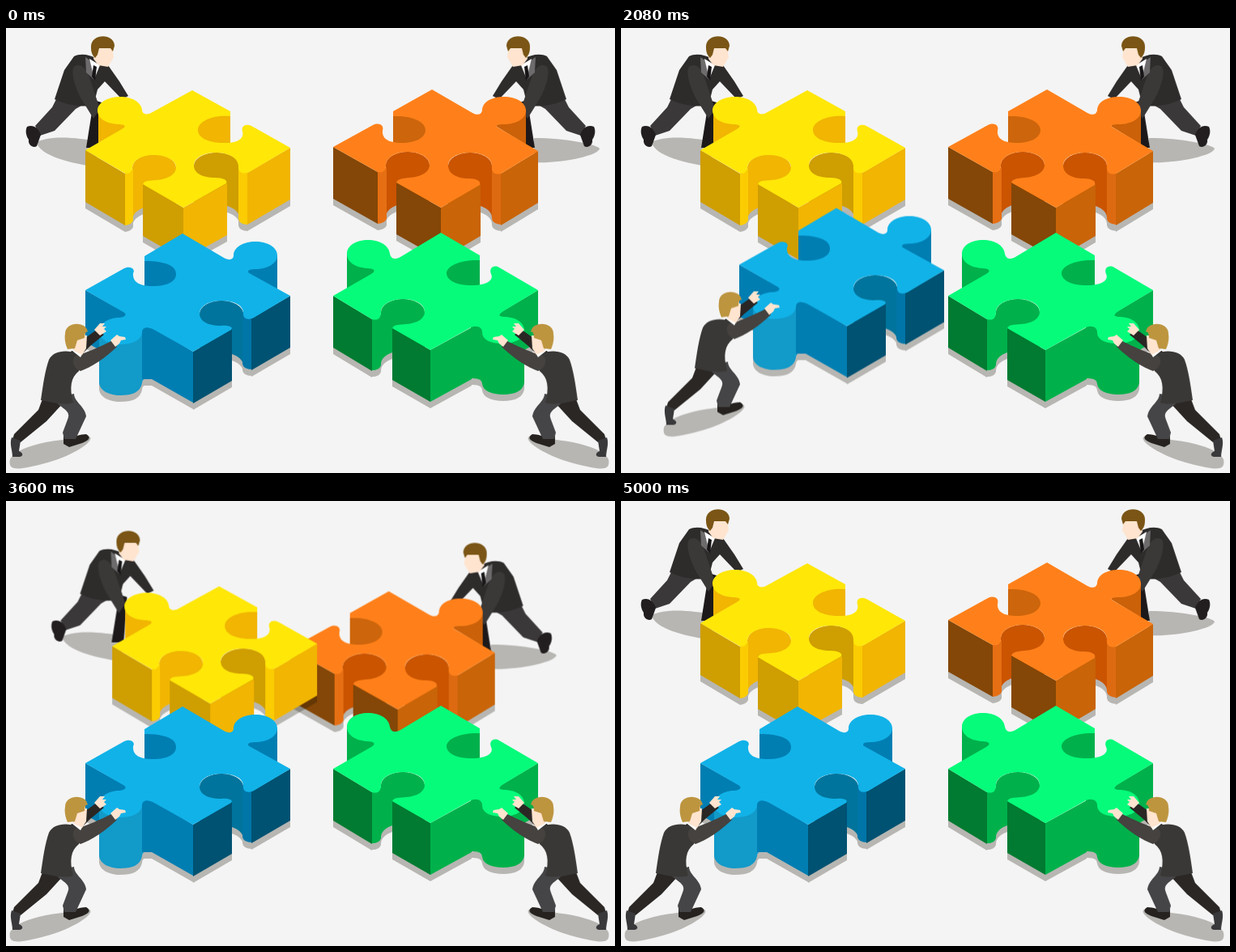
An HTML page that plays this animation: 752x550 px, repeating every 5040 ms.

```html
<!DOCTYPE html>
<html lang="en">
<head>
<meta charset="utf-8">
<title>Puzzle team</title>
<style>
html, body { margin: 0; width: 100%; height: 100%; overflow: hidden; background: #f4f4f4; }
svg { display: block; width: 752px; height: 550px; }
.move { animation: 5040ms linear infinite; }
.green { animation-name: green; }
.blue { animation-name: blue; }
.yellow { animation-name: yellow; }
.orange { animation-name: orange; }
@keyframes green {
  0%, .99%, 36.51%, 100% { transform: translate(0, 0); }
  18.06%, 23.31% { transform: translate(var(--x), var(--y)); }
}
@keyframes blue {
  0%, 21.43%, 57.54%, 100% { transform: translate(0, 0); }
  34.52%, 44.44% { transform: translate(var(--x), var(--y)); }
}
@keyframes yellow {
  0%, 42.26%, 78.08%, 100% { transform: translate(0, 0); }
  55.36%, 64.88% { transform: translate(var(--x), var(--y)); }
}
@keyframes orange {
  0%, 61.81%, 95.93%, 100% { transform: translate(0, 0); }
  78.08%, 82.74% { transform: translate(var(--x), var(--y)); }
}
</style>
</head>
<body>
<svg id="stage" viewBox="0 0 752 550"></svg>
<script>
const shade = 'rgba(20,17,0,.27)';
const skin = '#ffe4cf';
const path = (fill, d) => `<path fill="${fill}" d="${d}"/>`;
const paint = list => list.map(([fill, d]) => path(fill, d)).join('');
const move = (name, [x, y], body) =>
  `<g class="move ${name}" style="--x:${x}px;--y:${y}px">${body}</g>`;
const mirror = (width, body) => `<g transform="translate(${width} 0) scale(-1 1)">${body}</g>`;

// Vertical face below the edge (x1,y1)-(x2,y2)
const wall = (x1, y1, x2, y2, h = 64) => `M${x1} ${y1}L${x2} ${y2}v${h}L${x1} ${y1 + h}Z`;

// Curved back wall inside a round notch
const well = (x, y, rx, ry, h = 64) =>
  `M${x - rx} ${y}a${rx} ${ry} 0 0 1 ${2 * rx} 0v${h}a${rx} ${ry} 0 0 0 ${-2 * rx} 0Z`;

const piece = ({ wells, inner, walls, top }) =>
  `<path fill="${shade}" transform="translate(0 8)" d="${[...wells, ...walls].map(w => w[1]).join('')}"/>` +
  paint([...wells, ...inner, ...walls, top]);

const yellow = {
  wells: [
    ['#f1b502', well(183, 173, 27, 17)],
    ['#cf9e00', well(260, 170, 28, 16)]
  ],
  inner: [
    ['#f1b502', 'M114 102H152V124L114 142Z'],
    ['#f1b502', 'M277 104V143H234V108Z']
  ],
  walls: [
    ['#cf9e00', wall(98, 151, 147, 180)],
    ['#fbcc02', 'M147 179L157 174V238Q155 243 147 244Z'],
    ['#cf9e00', wall(169, 193, 219, 222)],
    ['#f1b502', wall(219, 222, 273, 192)],
    ['#fbcc02', 'M287 172L299 179V243Q288 243 287 236Z'],
    ['#f1b502', wall(298, 179, 351, 148)]
  ],
  top: ['#ffe708', `M98 151L143 125C150 121 146 119 138 119C122 118 113 111 113 102
    C113 92 126 85 141 85C156 85 167 92 168 101C168 106 173 108 179 105L230 77L277 103V109
    C256 107 237 115 237 126C237 138 256 143 274 142C289 141 294 135 292 128
    C290 121 296 118 303 121L351 148L302 177C293 182 286 179 287 170
    C286 160 274 154 259 154C243 154 232 161 232 170C232 180 244 185 258 185
    C268 185 274 188 272 192L219 222L169 193C171 188 177 189 185 188
    C200 187 210 181 210 172C210 163 197 157 182 157C167 157 156 164 156 173
    C155 179 151 181 146 179Z`]
};

const orange = {
  wells: [
    ['#ca5400', well(496, 169, 27, 16)],
    ['#ca5400', well(573, 170, 27, 16)]
  ],
  inner: [
    ['#cb6109', 'M642 102V144L606 122V104Z'],
    ['#cd650c', 'M478 105V143H522V108Z']
  ],
  walls: [
    ['#844707', wall(404, 147, 459, 178)],
    ['#e66f13', 'M459 178L470 172V236Q468 241 459 242Z'],
    ['#844707', wall(482, 191, 537, 222)],
    ['#c96408', wall(537, 222, 586, 193)],
    ['#dd6a11', 'M600 172L612 180V243Q601 242 600 236Z'],
    ['#c96408', wall(611, 180, 657, 152)]
  ],
  top: ['#ff801a', `M404 147L453 120C462 116 467 121 465 127C464 137 473 142 489 142
    C507 142 518 135 518 126C518 116 502 108 478 109V103L526 76L576 105
    C583 109 588 106 588 101C589 91 600 85 615 85C630 85 642 92 642 102
    C642 112 631 118 617 119C607 119 602 120 609 124L657 152L611 180
    C603 182 599 178 600 170C600 161 589 154 573 154C557 154 546 161 546 170
    C546 180 557 186 571 186C581 186 587 189 585 194L537 222L482 191
    C484 186 490 186 498 185C513 184 523 178 523 169C523 160 511 153 496 153
    C481 153 469 160 469 170C469 177 465 179 459 178Z`]
};

const blue = {
  wells: [['#00749c', well(266, 353, 27, 16)]],
  inner: [
    ['#007eb2', 'M335 281V323L299 303V284Z'],
    ['#007eb2', 'M171 288V320H213V288Z'],
    ['#007eb2', 'M115 345H160V380H115Z']
  ],
  walls: [
    ['#007eb2', wall(98, 324, 144, 350)],
    ['#129ac9', 'M115 374H168L180 371V434Q168 431 168 439C166 450 156 454 141 454S115 447 115 438Z'],
    ['#007eb2', 'M168 370H182L231 400V463L180 434H168Z'],
    ['#005272', wall(231, 400, 279, 372)],
    ['#0075a7', 'M292 351L304 358V422Q293 422 292 415Z'],
    ['#005272', wall(303, 359, 351, 331)]
  ],
  top: ['#11b2e8', `M98 324L146 297C155 293 160 299 157 303C156 314 165 319 181 319
    C200 319 210 313 210 304C210 294 197 288 171 288V282L218 254L269 284
    C276 288 281 286 281 281C281 271 293 264 308 264C323 264 335 271 335 281
    C335 291 323 298 308 298C299 298 296 301 302 304L351 331L306 358
    C298 362 292 359 293 351C292 342 281 337 266 337C250 337 239 344 239 353
    C239 363 251 368 265 368C276 367 281 370 278 373L231 400L183 373
    C174 368 168 370 168 376C167 386 156 391 141 391C126 391 115 384 115 375
    C115 365 127 358 140 358C149 357 150 353 143 350Z`]
};

const green = {
  wells: [['#00b14b', well(490, 351, 27, 16)]],
  inner: [
    ['#00b14b', 'M421 279H458V304L421 322Z'],
    ['#00b14b', 'M585 281V318H541V287Z'],
    ['#00b14b', 'M574 352H632V385H574Z']
  ],
  walls: [
    ['#007b31', wall(404, 331, 452, 360)],
    ['#00b14b', 'M452 360L463 354V417Q461 423 452 423Z'],
    ['#007b31', wall(477, 371, 524, 398)],
    ['#00b14b', wall(524, 398, 575, 370)],
    ['#00b14b', wall(610, 352, 657, 324)],
    ['#00b14b', 'M574 370L588 374H640V438C639 448 629 453 614 453S589 448 588 440Q588 432 574 433Z']
  ],
  top: ['#06fb7a', `M404 331L451 304C458 300 454 297 446 297C431 296 421 289 421 279
    C421 269 432 262 447 262C462 262 473 269 474 279C475 285 480 287 487 283
    L537 253L585 281V287C562 286 544 294 544 303C544 313 559 319 579 318
    C597 317 602 310 599 304C596 297 602 292 609 296L657 324L614 350
    C607 355 608 357 617 357C632 358 640 365 640 374C640 384 628 390 613 390
    C598 390 588 385 588 376C588 370 582 367 574 370L524 398L477 371
    C479 366 486 367 494 366C508 365 517 359 517 351C517 341 505 335 490 335
    C475 335 463 342 463 351C463 359 459 362 452 360Z`]
};

const pusher = paint([
  [shade, 'M5 533C12 520 40 513 62 510S100 500 104 506 80 530 48 538 2 549 5 533Z'],
  ['#2a2624', 'M76 404L98 383 112 373 121 379 104 393 88 409Z'],
  [skin, 'M109 373l7-8 6 0-3 4 5 0-3 3 3 3-8 5Z'],
  ['#2b2725', 'M46 456L40 472 10 502 8 509 18 512 50 486 72 462Z'],
  ['#39383a', 'M7 506C4 514 8 522 8 530H17C22 529 21 525 16 523L18 510Z'],
  ['#26221f', 'M71 504C80 508 90 502 99 502C106 506 102 510 94 513L78 518 71 514Z'],
  ['#454547', 'M58 458C66 470 82 472 76 484L70 500 72 508 86 508 99 480C98 468 84 462 84 452Z'],
  ['#3a3836', 'M53 410C58 399 74 397 88 402L92 412 90 424C80 432 78 444 83 463C70 467 54 462 43 460C46 440 48 424 53 410Z'],
  ['#45423f', 'M86 405C98 402 116 394 132 386L137 394C124 407 104 420 92 424C82 420 80 409 86 405Z'],
  [skin, 'M129 386l8-7 3 2 7 1 1 3-6 1-2 4-5 4Z'],
  ['#fff', 'M78 396L96 400 92 407Z'],
  [skin, 'M82 380H100L99 396 94 404 84 399Z'],
  ['#bd953f', 'M73 378C73 362 100 362 101 376C98 374 97 380 97 383L88 386 85 396 76 397C73 390 72 384 73 378Z']
]);

const leaner = paint([
  ['#3b3839', 'M64 84L57 98 36 121 42 133 60 127 86 100 100 92Z'],
  ['#221e1f', 'M26 122C34 119 40 124 43 132L38 146C34 149 27 145 28 138C24 132 24 126 26 122Z'],
  ['#1d191a', 'M92 84L106 104 99 148H114L118 92Z'],
  ['#2e2b2b', 'M84 35C92 31 104 33 112 38L126 46 140 66 151 84 143 88 122 66 113 76 108 96C92 98 74 95 60 88L72 52Z'],
  ['#3b3838', 'M84 48C92 42 100 50 104 64L116 100 108 112 92 86C84 70 80 54 84 48Z'],
  ['#6d6b6b', 'M98 36L104 40 109 64 99 55Z'],
  ['#fff', 'M103 38L116 46 109 63Z'],
  ['#171516', 'M108 46l4 2-2 17-4-5Z'],
  [skin, 'M110 24H131L133 36 126 48 114 46 108 38Z'],
  ['#7a5515', 'M105 24C104 6 134 6 134 22L132 29 129 25 115 25 113 33 110 37C106 33 105 29 105 24Z']
]);

const leftShade = path(shade, 'M38 141C56 132 90 136 112 140V172C84 168 40 158 38 141Z');
const rightShade = path(shade, 'M19 149C22 144 60 136 100 136V166C70 168 20 158 19 149Z');

document.getElementById('stage').innerHTML = [
  move('orange', [-90, 70], mirror(752, rightShade + leaner)),
  move('orange', [-90, 60], piece(orange)),
  move('yellow', [62.5, 53], leftShade + leaner),
  move('yellow', [66, 56.5], piece(yellow)),
  move('blue', [48, -31.5], piece(blue)),
  move('green', [-40, -30], piece(green)),
  move('blue', [48, -39.5], pusher),
  move('green', [-36, -31], mirror(749, pusher))
].join('');
</script>
</body>
</html>
```
